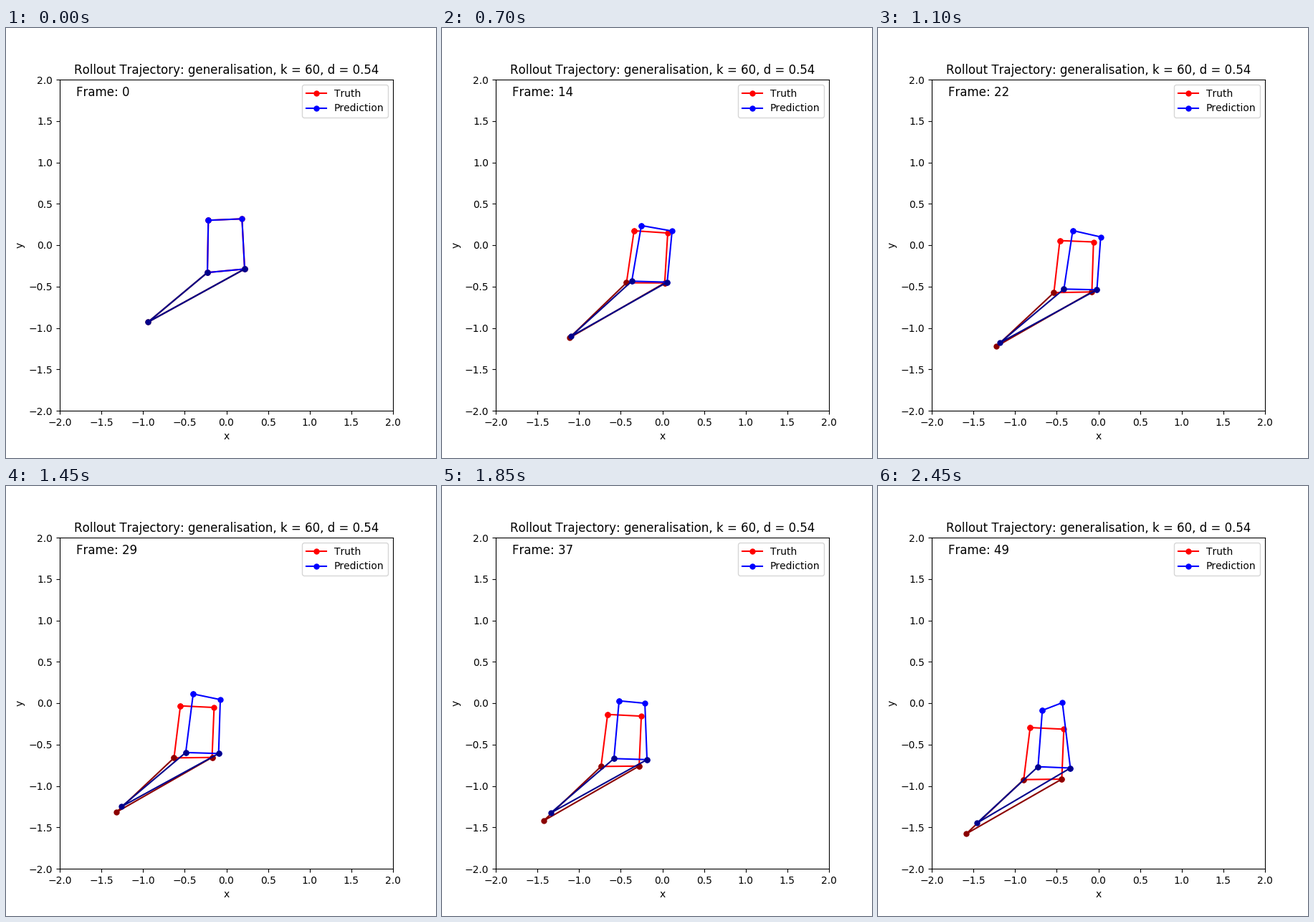
A matplotlib script for the animation above (2.5 s loop, 600 by 600 pixels).

```python
import numpy as np
import matplotlib.pyplot as plt
from matplotlib.animation import FuncAnimation

FRAMES = 50
plt.rcParams["text.kerning_factor"] = 6  # whole-pixel kerning

# Stage pixels, nodes: top left, top right, bottom right, bottom left, far tip
REST = np.array([(288.5, 262.8), (335.5, 265.1), (332.6, 334.8),
                 (279.5, 335.4), (199.3, 411.1)])
STRETCH = np.array([(-6.2, 5.5), (-6.2, 1.2), (0.4, 1.5), (1.5, 5.8), (-1.0, -0.8)])
DRIFT = np.array([-1.555, 1.515])  # per frame

# How far the prediction has strayed from the truth at a few moments
LAG_TIMES = np.array([3, 22, 37, 49])
LAG = np.array([
    [(0, 0)] * 5,
    [(18, -14), (10, -7), (7, -3), (14, -5), (5, -5)],
    [(16, -19), (5, -18), (11, -9), (18, -11), (10, -11)],
    [(17, -24), (-2, -37), (12, -15.5), (20, -18), (15, -15)],
], float)
LAG_SLOPES = np.gradient(LAG, LAG_TIMES, axis=0)
LAG_SLOPES[0] = 0


def truth(t):
    """A steady drift plus a damped oscillation of the springs."""
    ring = np.exp(-t / 9.7) * np.cos(0.265 * t)
    return REST + DRIFT * t + STRETCH * ring


def prediction(t):
    """The truth plus a smoothly growing error (cubic Hermite)."""
    t0 = max(t, LAG_TIMES[0])
    i = min(np.searchsorted(LAG_TIMES, t0, "right") - 1, len(LAG_TIMES) - 2)
    h = LAG_TIMES[i + 1] - LAG_TIMES[i]
    s = (t0 - LAG_TIMES[i]) / h
    ease = s * s * (3 - 2 * s)
    lag = ((1 - ease) * LAG[i] + ease * LAG[i + 1]
           + h * s * (1 - s) * ((1 - s) * LAG_SLOPES[i] - s * LAG_SLOPES[i + 1]))
    return truth(t) + lag


def to_data(pixels):
    x, y = pixels.T
    return np.array([(x - 75) / 116.25 - 2, (534 - y) / 115.5 - 2])


fig, ax = plt.subplots(figsize=(6, 6), dpi=100)
ax.set(xlim=(-2, 2), ylim=(-2, 2), xlabel="x", ylabel="y",
       title="Rollout Trajectory: generalisation, k = 60, d = 0.54")
counter = ax.text(-1.8, 1.8, "", fontsize=12)

BODY = [0, 1, 2, 3, 0]
TAIL = [3, 4, 2]


def add_line(color, label=None):
    return ax.plot([], [], "o-", color=color, markersize=5, label=label)[0]


shapes = []
for pose, name, bright, dark in [(truth, "Truth", "red", "darkred"),
                                 (prediction, "Prediction", "blue", "darkblue")]:
    shapes.append((add_line(bright, name), pose, BODY))
    shapes.append((add_line(dark), pose, TAIL))
ax.legend(loc="upper right")


def draw(frame):
    for line, pose, nodes in shapes:
        line.set_data(*to_data(pose(frame))[:, nodes])
    counter.set_text(f"Frame: {frame}")
    return [line for line, _, _ in shapes] + [counter]


anim = FuncAnimation(fig, draw, frames=FRAMES, interval=50, repeat=True, repeat_delay=0)
plt.show()
```
